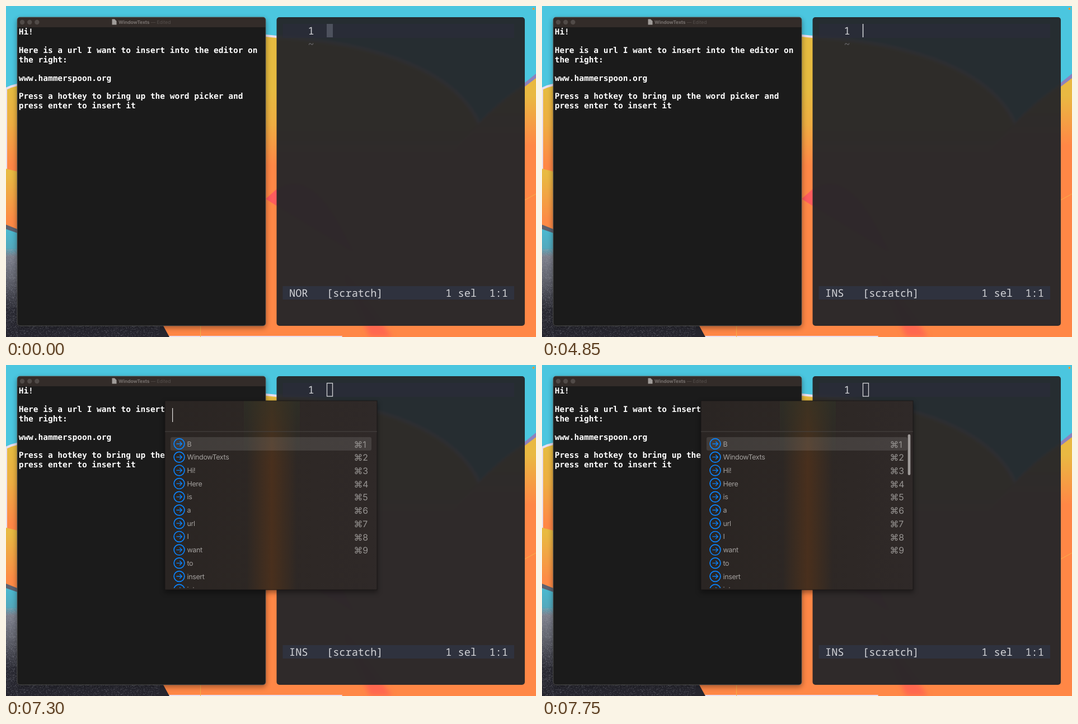
An HTML page for the animation above (8000 ms loop, 947 px wide and 592 px high).

```html
<!DOCTYPE html>
<html lang="en">
<head>
<meta charset="utf-8">
<title>Word picker</title>
<style>
  html, body { margin: 0; width: 100%; height: 100%; overflow: hidden; background: #4bc6df; }
  svg { display: block; width: 947px; height: 592px; }
  text { white-space: pre; text-rendering: geometricPrecision; }
  .note { font: bold 14.47px "DejaVu Sans Mono", monospace; fill: #fff; }
  .code { font: 18.62px "Noto Sans Mono", monospace; fill: #d3d4d8; }
  .title { font: 8.5px Inter, sans-serif; letter-spacing: -.01em; fill: #56504d; }
  .word { font: 12.5px Inter, sans-serif; letter-spacing: -.03em; fill: #a3a09e; }
  .key { font: 15.8px Inter, "DejaVu Sans", sans-serif; fill: #969391; }
</style>
</head>
<body>
<svg viewBox="0 0 947 592">
  <defs>
    <linearGradient id="ball" gradientUnits="userSpaceOnUse" x1="0" y1="150" x2="0" y2="285">
      <stop offset="0" stop-color="#e6bb40"/><stop offset=".45" stop-color="#eeae42"/><stop offset="1" stop-color="#ff8746"/>
    </linearGradient>
    <linearGradient id="hill" gradientUnits="userSpaceOnUse" x1="0" y1="160" x2="0" y2="250">
      <stop offset="0" stop-color="#e9b942"/><stop offset="1" stop-color="#ff8746"/>
    </linearGradient>
    <linearGradient id="fold" gradientUnits="userSpaceOnUse" x1="0" y1="300" x2="0" y2="385">
      <stop offset="0" stop-color="#e8ba42"/><stop offset="1" stop-color="#fd8a46"/>
    </linearGradient>
    <linearGradient id="rock" gradientUnits="userSpaceOnUse" x1="0" y1="400" x2="0" y2="592">
      <stop offset="0" stop-color="#4bb9d0"/><stop offset=".17" stop-color="#54a9bd"/>
      <stop offset=".25" stop-color="#7c7f8c"/><stop offset=".45" stop-color="#63656f"/>
      <stop offset=".75" stop-color="#2b2b34"/><stop offset="1" stop-color="#26252e"/>
    </linearGradient>
    <linearGradient id="stripe">
      <stop offset="0" stop-color="#5a3818" stop-opacity="0"/><stop offset=".5" stop-color="#5a3418" stop-opacity=".62"/>
      <stop offset="1" stop-color="#5a3818" stop-opacity="0"/>
    </linearGradient>
    <linearGradient id="olive" x2="0" y2="1">
      <stop offset="0" stop-color="#2f3526" stop-opacity=".75"/><stop offset="1" stop-color="#2f3526" stop-opacity="0"/>
    </linearGradient>
    <linearGradient id="sheet">
      <stop offset="0" stop-color="#2a2523"/><stop offset=".45" stop-color="#2d2724"/><stop offset="1" stop-color="#2f2928"/>
    </linearGradient>
    <clipPath id="leftClip"><rect x="20" y="20" width="444" height="552" rx="5"/></clipPath>
    <clipPath id="rightClip"><rect x="483.5" y="20" width="443.5" height="552" rx="5"/></clipPath>
    <clipPath id="listClip"><rect x="284" y="120" width="379" height="279"/></clipPath>
    <filter id="soft"><feGaussianBlur stdDeviation="5"/></filter>
    <filter id="blur"><feGaussianBlur stdDeviation="2"/></filter>
  </defs>

  <g id="wall">
    <path d="M0 0H947V592H0Z" fill="#4bc6df"/>
    <path id="arc" d="M0 148Q10 143 20 141Q240 40 464 53L483 55C620 62 800 100 848 215V592H0Z" fill="url(#ball)" stroke="#e9dff0" stroke-width="4"/>
    <path d="M947 125Q937 132 927 140C860 185 815 240 765 310L600 592H947Z" fill="url(#hill)"/>
    <path d="M926 138L947 121V129L926 145Z" fill="#8d82bd"/>
    <path d="M0 291L20 296V410H0Z" fill="url(#fold)"/>
    <path d="M464 345L483 328C530 300 570 330 620 440L483 357Z" fill="#ff5c5e"/>
    <path d="M600 470L690 592H650Z" fill="#ff684f" filter="url(#soft)"/>
    <path d="M927 347L947 336M347.5 572V592" stroke="#f5b04a" fill="none"/>
    <path d="M0 396L20 404V440L281 572L292 592H0Z" fill="url(#rock)"/>
    <path d="M0 391L20 399V406L0 399Z" fill="#5d6270"/>
    <path id="grain" fill="#a1a4ae" opacity=".5"/>
    <circle cx="942.5" cy="5" r="2" fill="#ff9a2e"/>
  </g>

  <g filter="url(#soft)" opacity=".35">
    <rect x="19" y="23" width="446" height="553" rx="6"/>
  </g>
  <g clip-path="url(#leftClip)">
    <path d="M20 20H464V572H20Z" fill="#1b1b1b"/>
    <path d="M20 20H464V38H20Z" fill="#332c29"/>
  </g>
  <rect x="20" y="20" width="444" height="552" rx="5" fill="none" stroke="#5d5b59" stroke-opacity=".75"/>
  <g fill="#514b48"><circle cx="29" cy="29" r="4.2"/><circle cx="42.2" cy="29" r="4.2"/><circle cx="55.3" cy="29" r="4.2"/></g>
  <path d="M189.5 23.5H194L197.5 27V33.5H189.5Z" fill="#a09c99"/>
  <text class="title" x="201" y="32"><tspan font-weight="bold" fill="#77716e">WindowTexts</tspan> — Edited</text>
  <g id="notes" class="note"></g>

  <g clip-path="url(#rightClip)">
    <use href="#wall" filter="url(#blur)"/>
    <path d="M483 20H927V572H483Z" fill="#242529" opacity=".95"/>
    <path d="M494.5 32H908V57H494.5Z" fill="#2c2d39" opacity=".7"/>
    <path d="M494.5 501H908V525H494.5Z" fill="#2f323e"/>
  </g>
  <g class="code">
    <text x="539.5" y="51">1</text>
    <text x="539.5" y="75" style="fill:#6d6c70">~</text>
    <text id="mode" x="506" y="520"></text>
    <text x="573" y="520">[scratch]</text>
    <text x="785.2" y="520">1 sel</text>
    <text x="863.4" y="520">1:1</text>
  </g>
  <rect id="block" x="573" y="32" width="11" height="24" fill="#4d515d"/>
  <rect id="bar" x="572.8" y="32" width="1.5" height="24" fill="#d8d9dd"/>
  <rect id="hollow" x="573.5" y="32.5" width="10" height="23.5" fill="none" stroke="#d3d4d8" stroke-width="1.3"/>

  <g id="picker">
    <rect x="283" y="67" width="381" height="340" filter="url(#soft)" opacity=".4"/>
    <rect x="284" y="64" width="379" height="338" fill="url(#sheet)"/>
    <rect x="430" y="64" width="90" height="338" fill="url(#stripe)"/>
    <rect x="425" y="64" width="100" height="110" fill="url(#olive)" opacity=".6"/>
    <rect x="284" y="64" width="379" height="338" fill="none" stroke="#171615" stroke-opacity=".8"/>
    <path d="M284 119H663" stroke="#494442"/>
    <rect x="294" y="129" width="359" height="24" rx="3" fill="#fff" opacity=".105"/>
    <g id="list" clip-path="url(#listClip)"></g>
    <rect id="caret" x="297" y="77" width="1.2" height="25" fill="#e4e2e0"/>
    <rect id="scroll" x="653.7" y="124" width="4.6" height="73" rx="2.3" fill="#a09c9a"/>
  </g>
</svg>
<script>
  const $ = id => document.getElementById(id);
  const LOOP = 8000, INSERT = 4850, UNFOCUS = 7250, OPEN = 7300;

  const notes = ["Hi!", "", "Here is a url I want to insert into the editor on", "the right:", "",
    "www.hammerspoon.org", "", "Press a hotkey to bring up the word picker and", "press enter to insert it"];
  $("notes").innerHTML = notes.map((s, i) => `<text x="22.7" y="${51.3 + 16.45 * i}">${s}</text>`).join("");

  const words = "B WindowTexts Hi! Here is a url I want to insert into".split(" ");
  $("list").innerHTML = words.map((word, i) => `<g transform="translate(0 ${23.7 * i})">
    <g fill="none" stroke="#0a84ff" stroke-width="1.7">
      <circle cx="309.5" cy="141" r="9.4"/><path d="M304.5 141H314M310.3 137L314.3 141L310.3 145" stroke-width="1.3"/>
    </g>
    <text class="word" x="323.5" y="145.5">${word}</text>
    ${i < 9 ? `<text class="key" x="621.5" y="147.7">⌘${i + 1}</text>` : ""}</g>`).join("");

  // Seeded specks on the dark rock, thinning towards the bottom right.
  let seed = 7;
  const random = () => (seed = seed * 16807 % 2147483647) / 2147483647;
  let specks = "";
  for (let i = 0; i < 1500; i++) {
    const side = i % 2;
    const x = side ? random() * 20 : 20 + random() * 255;
    const y = side ? 435 + 157 * random() ** 1.3 : 572 + 20 * random() ** 1.6;
    specks += `M${x.toFixed(1)} ${y.toFixed(1)}h.8v.8h-.8z`;
  }
  $("grain").setAttribute("d", specks);

  const show = (id, on) => $(id).style.opacity = +on;
  const ramp = (t, from, to) => Math.min(1, Math.max(0, (t - from) / (to - from)));

  function draw() {
    const t = performance.now() % LOOP;
    $("mode").textContent = t < INSERT ? "NOR" : "INS";
    show("block", t < INSERT);
    show("bar", t >= INSERT && t < UNFOCUS);
    show("hollow", t >= UNFOCUS);
    show("picker", t >= OPEN);
    show("caret", 1 - ramp(t, 7550, 7750));
    show("scroll", ramp(t, 7350, 7550));
    requestAnimationFrame(draw);
  }
  draw();
</script>
</body>
</html>
```
